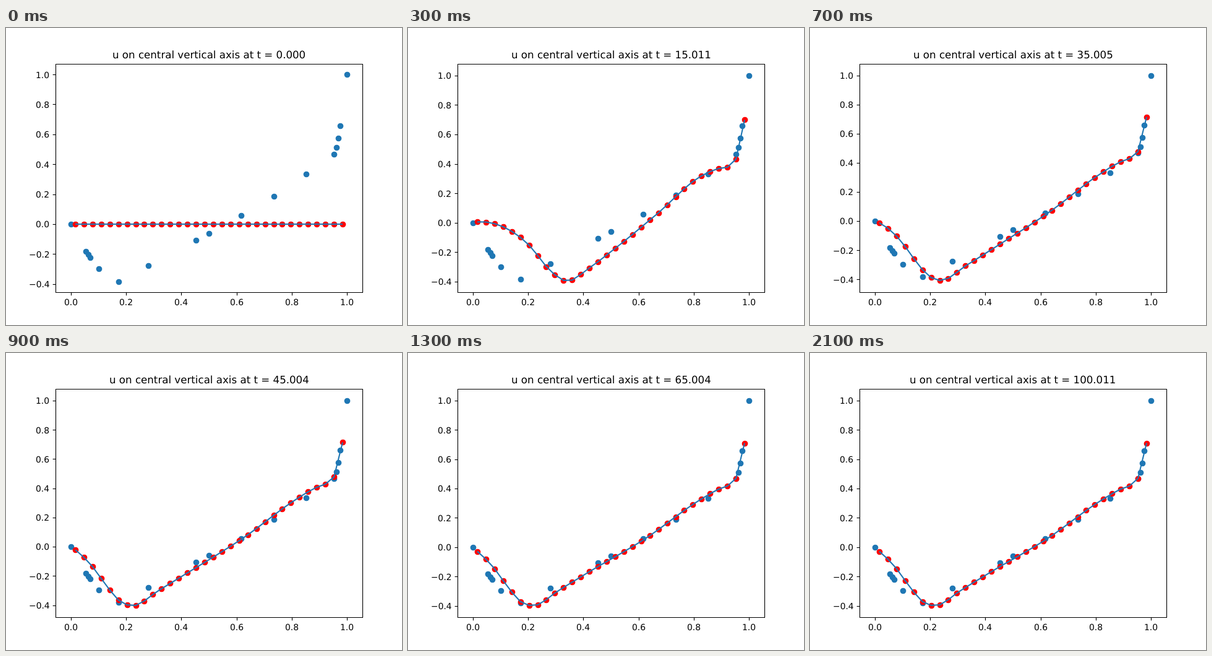
Recreate the animation shown at these times as an HTML page with a canvas. Size 640 px wide and 480 px high, loop 2.2 s.

```html
<!DOCTYPE html>
<html lang="en">
<head>
<meta charset="utf-8">
<title>Velocity profile</title>
<style>
html, body { margin: 0; width: 100%; height: 100%; overflow: hidden; background: #fff; }
canvas { display: block; }
</style>
</head>
<body>
<canvas id="plot" width="640" height="480"></canvas>
<script>
const ctx = document.getElementById('plot').getContext('2d');
const BLUE = '#1f77b4', RED = '#ff0000';
const LEFT = 80, RIGHT = 576, TOP = 57.6, BOTTOM = 427.2;
const STEP = 100, STEPS = 22, CELLS = 32;

// Fixed markers: position in 128ths, velocity
const MARKS = [
  [0, 0], [7, -.181], [8, -.202], [9, -.222], [13, -.297], [22, -.383],
  [36, -.278], [58, -.106], [64, -.061], [79, .057], [94, .187], [109, .333],
  [122, .466], [123, .511], [124, .575], [125, .659], [128, 1]
];

// Step and simulation time
const CLOCK = [[0, 0], [2, 10.013], [5, 25.007], [9, 45.004],
  [13, 65.004], [17, 85.002], [20, 100], [21, 100.011]];

// Key velocities: wall to dip, dip to shoulder, lid layer
const PHASES = [
  { step: 0, dip: 24, u: Array(13).fill(0) },
  { step: 2, dip: 12.5, u: [.004, -.006, -.094, -.264, -.376, -.305, -.195, .056, .298, .327, .327, .386, .68] },
  { step: 5, dip: 8.1, u: [.009, -.053, -.231, -.361, -.415, -.313, -.193, .057, .34, .411, .429, .48, .719] },
  { step: 9, dip: 6.5, u: [-.021, -.133, -.29, -.375, -.404, -.296, -.179, .061, .339, .407, .428, .477, .714] },
  { step: 13, dip: 6.3, u: [-.029, -.139, -.291, -.373, -.4, -.289, -.172, .056, .329, .396, .417, .469, .71] }
];

const mix = (a, b, k) => a + (b - a) * k;
const snap = v => Math.floor(v + .5) + .5;

// Index of the span that holds v
function span(list, v) {
  let n = 0;
  while (n < list.length - 2 && v >= list[n + 1]) n++;
  return n;
}

// Cells of the key velocities, spread around the dip
function knots(dip) {
  const shoulder = 26;
  return [
    ...[0, .3, .6, .8, 1].map(f => f * dip),
    ...[1 / 6, 1 / 3, 2 / 3, 1].map(f => mix(dip, shoulder, f)),
    28, 29, 30, 31
  ];
}

// Smooth curve through the points (xs, ys)
function spline(xs, ys) {
  const last = xs.length - 1;
  const chord = n => (ys[n + 1] - ys[n]) / (xs[n + 1] - xs[n]);
  const slope = xs.map((x, n) => {
    if (n === 0 || n === last) return chord(Math.min(n, last - 1));
    const a = x - xs[n - 1], b = xs[n + 1] - x;
    return (chord(n - 1) * b + chord(n) * a) / (a + b);
  });
  slope[0] = 2 * chord(0) - slope[1];
  return x => {
    const n = span(xs, x), h = xs[n + 1] - xs[n], s = (x - xs[n]) / h, r = 1 - s;
    return mix(ys[n], ys[n + 1], s * s * (3 - 2 * s)) +
      h * s * r * (slope[n] * r - slope[n + 1] * s);
  };
}

function profile(step) {
  const n = span(PHASES.map(p => p.step), step);
  const a = PHASES[n], b = PHASES[n + 1];
  const part = Math.min(1, (step - a.step) / (b.step - a.step));
  const k = 1 - Math.pow(1 - part, 1.7);
  const curve = spline(knots(mix(a.dip, b.dip, k)), a.u.map((v, i) => mix(v, b.u[i], k)));
  return Array.from({ length: CELLS }, (_, i) => curve(i));
}

function clock(step) {
  const n = span(CLOCK.map(c => c[0]), step);
  const [s0, t0] = CLOCK[n], [s1, t1] = CLOCK[n + 1];
  return mix(t0, t1, (step - s0) / (s1 - s0));
}

function dots(points, color) {
  ctx.fillStyle = color;
  for (const [x, y] of points) {
    ctx.beginPath();
    ctx.arc(snap(x), snap(y), 4.86, 0, 2 * Math.PI);
    ctx.fill();
  }
}

// Text on whole pixels; align is 0 left, .5 centre, 1 right
function text(str, x, y, size, align) {
  ctx.font = size + 'px "DejaVu Sans", sans-serif';
  ctx.textRendering = 'geometricPrecision';
  const left = x - ctx.measureText(str).width * align;
  ctx.fillText(str, Math.round(left), Math.round(y));
}

function tick(x, y, dx, dy) {
  ctx.beginPath();
  ctx.moveTo(x, y);
  ctx.lineTo(x + dx, y + dy);
  ctx.stroke();
}

function draw(step) {
  const u = profile(step);
  const low = Math.min(...MARKS.map(m => m[1]), ...u);
  const pad = step === 0 ? 17.5 : 19.3;
  const unit = (BOTTOM - TOP - 2 * pad) / (1 - low);
  const px = x => 105.05 + 445.9 * x;
  const py = y => TOP + pad + (1 - y) * unit;
  const curve = u.map((v, i) => [px((i + .5) / CELLS), py(v)]);

  ctx.fillStyle = '#fff';
  ctx.fillRect(0, 0, 640, 480);
  dots(MARKS.map(([x, y]) => [px(x / 128), py(y)]), BLUE);
  dots(curve, RED);

  ctx.strokeStyle = BLUE;
  ctx.lineWidth = 2.083;
  ctx.lineJoin = 'round';
  ctx.beginPath();
  curve.forEach(([x, y]) => ctx.lineTo(x, y));
  ctx.stroke();

  ctx.strokeStyle = ctx.fillStyle = '#000';
  ctx.lineWidth = 1.11;
  const l = snap(LEFT), t = snap(TOP), b = snap(BOTTOM);
  ctx.strokeRect(l, t, snap(RIGHT) - l, b - t);
  for (let i = 0; i <= 5; i++) {
    const x = px(i / 5);
    tick(snap(x), b, 0, 4.86);
    text((i / 5).toFixed(1), x, 448, 13.89, .5);
  }
  for (let i = -2; i <= 5; i++) {
    const y = py(i / 5);
    tick(l, snap(y), -4.86, 0);
    text((i / 5).toFixed(1).replace('-', '\u2212'), 70.3, y + 5.4, 13.89, 1);
  }
  text('u on central vertical axis at t = ' + clock(step).toFixed(3), 328, 49, 16.667, .5);
}

const start = performance.now();
function loop() {
  draw(Math.floor((performance.now() - start) / STEP) % STEPS);
  requestAnimationFrame(loop);
}
loop();
</script>
</body>
</html>
```
